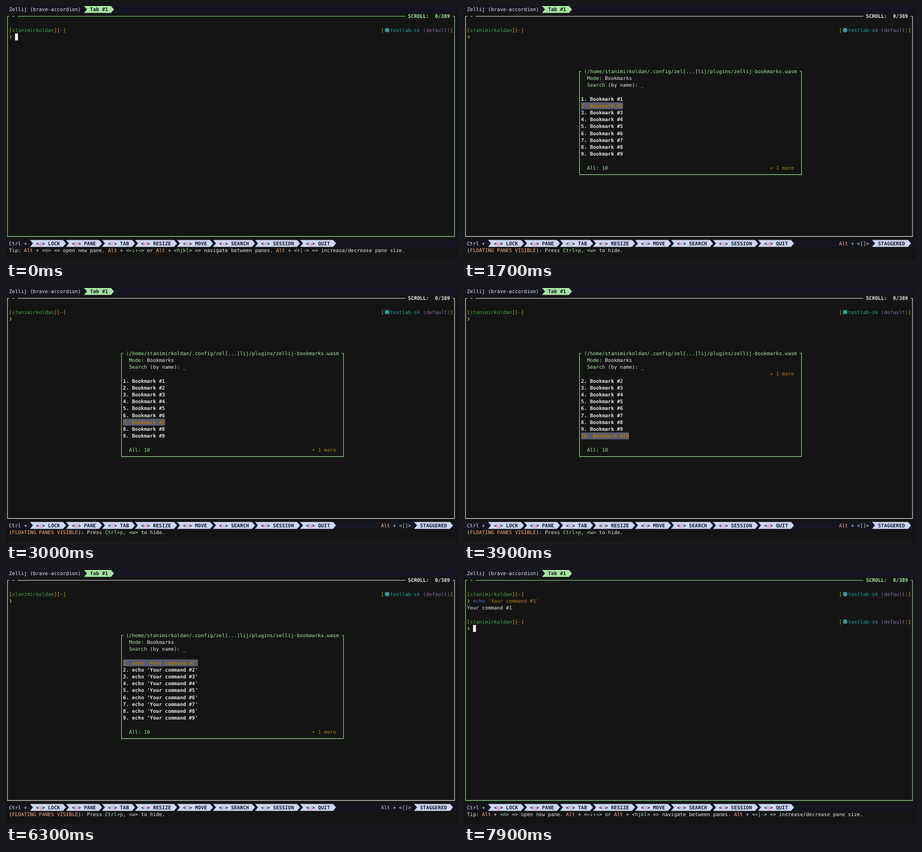
Animation of 800x450 px, one loop 8 s. Source, as an HTML page:

```html
<!DOCTYPE html>
<html lang="en">
<head>
<meta charset="utf-8">
<title>Terminal bookmarks</title>
<style>
  html, body { margin: 0; width: 100%; height: 100%; overflow: hidden; background: #141414; }
  svg { display: block; width: 800px; height: 450px; }
  text {
    font: 8.82px "DejaVu Sans Mono", "Noto Sans Mono", monospace;
    text-rendering: geometricPrecision;
    white-space: pre;
  }
  .bold { font-weight: 700; }
</style>
</head>
<body>
<svg id="stage" viewBox="0 0 800 450"></svg>
<script>
const NS = 'http://www.w3.org/2000/svg';
const CW = 5.31, RH = 12.19, LOOP = 8000;
const BAR = '#151521', BG = '#141414';
const COLORS = {
  w: '#e4e4e4', g: '#a6e3a1', o: '#f2ac80', p: '#f38ba8', d: '#181825', l: '#cdd6f4',
  y: '#d3a51c', u: '#4f9a4c', b: '#5b74ad', t: '#2f9c92', v: '#83699a', m: '#a8821f', s: '#a37a12'
};
const USER = 'stanimirkoldan';
const CONTEXT = 'testlab-sk';
const stage = document.getElementById('stage');

// Start time, view, selected entry
const STEPS = [
  [0, 'shell'],
  [600, 'names', 1], [1600, 'names', 2], [1900, 'names', 3], [2100, 'names', 4],
  [2400, 'names', 5], [2700, 'names', 6], [2900, 'names', 7], [3300, 'names', 8],
  [3600, 'names', 9], [3800, 'names', 10], [4500, 'names', 1],
  [5800, 'commands', 1],
  [7700, 'done']
];

function add(tag, attrs, parent = stage) {
  const el = document.createElementNS(NS, tag);
  for (const key in attrs) el.setAttribute(key, attrs[key]);
  parent.appendChild(el);
  return el;
}

function box(col, row, cols, fill) {
  add('rect', { x: col * CW, y: row * RH, width: cols * CW, height: RH, fill });
}

// "{g}abc{w}def" switches colour at each tag
function write(col, row, markup, bold) {
  const parts = ('{w}' + markup).split(/\{(\w)\}/);
  for (let i = 1; i < parts.length; i += 2) {
    const str = parts[i + 1];
    if (!str) continue;
    const el = add('text', { x: col * CW, y: row * RH + 9.2, fill: COLORS[parts[i]] });
    if (bold) el.setAttribute('class', 'bold');
    el.textContent = str;
    col += str.length;
  }
}

function ribbon(col, row, markup, fill) {
  const len = markup.replace(/\{\w\}/g, '').length;
  const x = col * CW, end = (col + len + 4) * CW;
  const top = row * RH, mid = top + RH / 2, low = top + RH;
  add('path', {
    d: `M${x} ${top}H${end - CW}L${end} ${mid}L${end - CW} ${low}H${x}L${x + CW} ${mid}Z`, fill
  });
  write(col + 2, row, markup, true);
  return col + len + 4;
}

// Frame through cell centres, open on top between the given column pairs
function frame(left, top, right, bottom, gaps, stroke) {
  const cx = c => (c + .5) * CW, cy = r => (r + .5) * RH;
  let d = `M${cx(left)} ${cy(top)}V${cy(bottom)}H${cx(right)}V${cy(top)}M${cx(left)} ${cy(top)}`;
  for (const [from, to] of gaps) d += `H${from * CW}M${to * CW} ${cy(top)}`;
  add('path', { d: d + `H${cx(right)}`, fill: 'none', stroke, 'stroke-width': 1.1, 'stroke-linecap': 'square' });
}

function prompt(row) {
  write(1, row, `{y}[{u}${USER}{y}][{b}~{y}]`);
  write(125, row, '{y}[');
  add('circle', { cx: 674.5, cy: (row + .5) * RH, r: 3.9, fill: COLORS.t });
  write(128, row, `{t}${CONTEXT} {v}(default){y}]`);
  const y = (row + 1) * RH;
  add('path', {
    d: `M7 ${y + 3.6}Q10.6 ${y + 6.3} 7 ${y + 9}`, fill: 'none', stroke: '#93ad3e', 'stroke-width': 1.4
  });
}

function chrome(floating) {
  box(0, 0, 151, BAR);
  box(0, 34, 151, BAR);
  write(1, 0, 'Zellij (brave-accordion)');
  ribbon(26, 0, '{d}Tab #1', COLORS.g);

  const tone = floating ? 'w' : 'g';
  frame(0, 1, 149, 33, [[1, 4], [133, 149]], floating ? '#d2d2d2' : '#8fca89');
  write(2, 1, `{${tone}}~`);
  write(134, 1, `{${tone}}SCROLL:  0/389`, true);

  write(1, 34, 'Ctrl +');
  let col = 8;
  const keys = 'g LOCK,p PANE,t TAB,n RESIZE,h MOVE,s SEARCH,o SESSION,q QUIT';
  for (const item of keys.split(',')) {
    const [key, name] = item.split(' ');
    col = ribbon(col, 34, `{d}<{p}${key}{d}> ${name}`, COLORS.l);
  }
  if (floating) {
    write(125, 34, '{o}Alt{w} + <{g}[]{w}>');
    ribbon(136, 34, '{d}STAGGERED', COLORS.l);
    write(1, 35, '({o}FLOATING PANES VISIBLE{w}): Press {g}Ctrl+p{w}, <{g}w{w}> to hide.');
  } else {
    write(1, 35, 'Tip: {o}Alt{w} + <{g}n{w}> => open new pane. {o}Alt{w} + <{g}←↓↑→{w}> or ' +
      '{o}Alt{w} + <{g}hjkl{w}> => navigate between panes. {o}Alt{w} + <{g}+|-{w}> => increase/decrease pane size.');
  }
}

function bookmarks(view, sel) {
  add('rect', { x: 38 * CW, y: 9 * RH, width: 75 * CW, height: 16 * RH, fill: BG });
  frame(38, 9, 112, 24, [[39, 112]], '#8fca89');
  write(40, 9, `{g}(/home/${USER}/.config/zel[...]lij/plugins/zellij-bookmarks.wasm`);
  write(41, 10, '{g}Mode{w}: Bookmarks');
  write(41, 11, '{g}Search{w} (by name): _');
  const first = sel > 9 ? 2 : 1;
  for (let i = 0; i < 9; i++) {
    const n = first + i, row = 13 + i;
    const label = `${n}. ` + (view === 'names' ? `Bookmark #${n}` : `echo 'Your command #${n}'`);
    if (n === sel) box(39, row, label.length, '#585b70');
    write(39, row, (n === sel ? '{s}' : '{w}') + label, true);
  }
  write(102, first > 1 ? 12 : 23, '{m}+ 1 more');
  write(41, 23, '{g}All: 10');
}

function draw([, view, sel]) {
  stage.replaceChildren();
  add('rect', { width: 800, height: 450, fill: BG });
  const floating = view === 'names' || view === 'commands';
  chrome(floating);
  prompt(3);
  if (floating) return bookmarks(view, sel);
  let row = 4;
  if (view === 'done') {
    write(3, 4, "{b}echo {m}'Your command #1'");
    write(1, 5, 'Your command #1');
    prompt(7);
    row = 8;
  }
  box(3, row, 1, '#f4f4f4');
}

let shown = null;
function tick() {
  const t = performance.now() % LOOP;
  const step = STEPS.findLast(s => s[0] <= t);
  if (step !== shown) draw(shown = step);
  requestAnimationFrame(tick);
}
tick();
</script>
</body>
</html>
```
